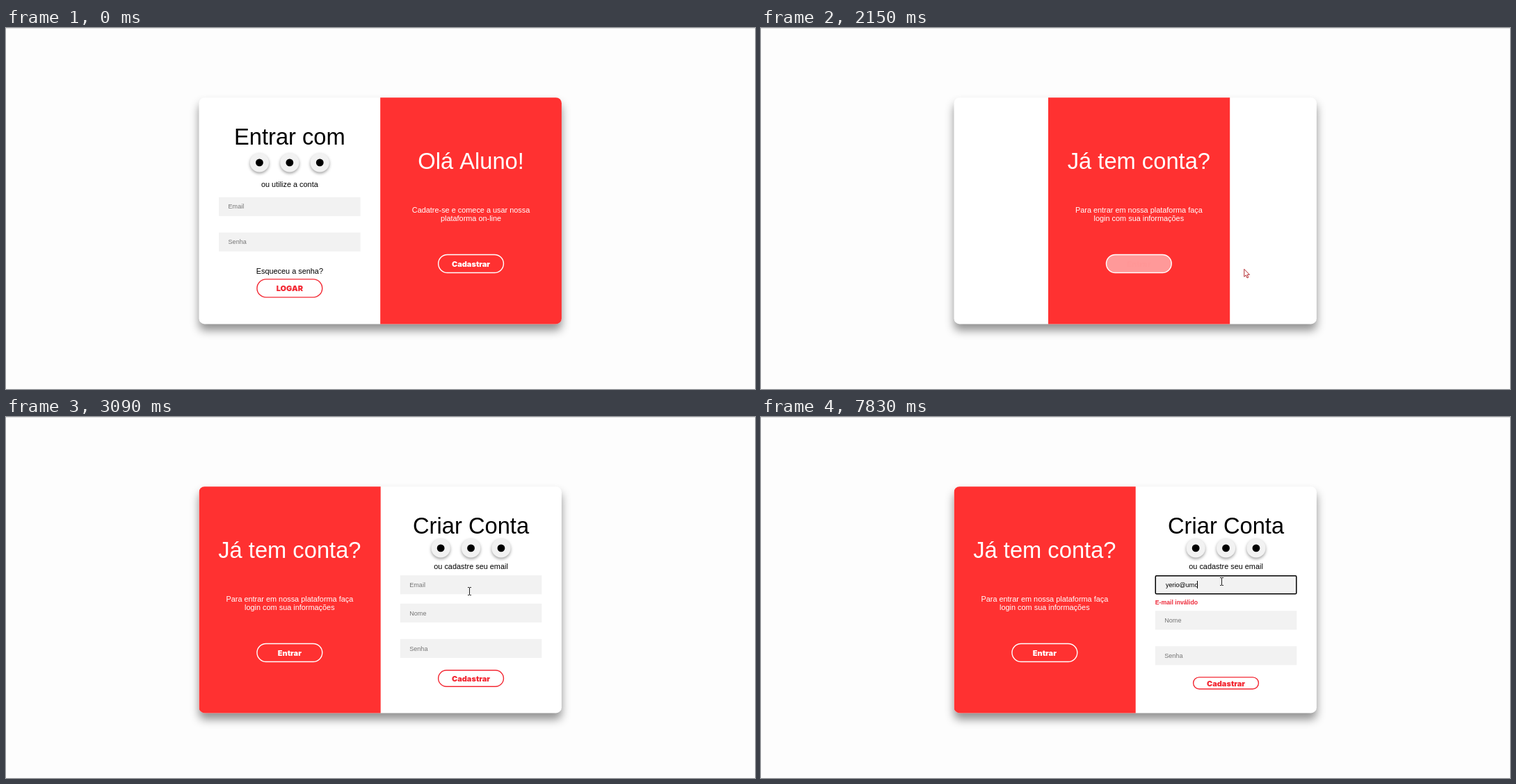
Write an HTML page with a canvas that moves like this. It is 1077 by 520 pixels and loops after 8000 ms.

```html
<!DOCTYPE html>
<html lang="pt">
<head>
<meta charset="utf-8">
<title>Login</title>
<style>
  html, body { margin: 0; width: 100%; height: 100%; overflow: hidden; background: #fdfdfd; }
  canvas { display: block; width: 1077px; height: 520px; }
</style>
</head>
<body>
<canvas id="stage" width="1077" height="520"></canvas>
<script>
const ctx = document.getElementById('stage').getContext('2d');
const LOOP = 8000;
const SANS = '"Liberation Sans", Arial, sans-serif';
const HEAVY = 'Inter, "Liberation Sans", sans-serif';
const RED = '#ff3131', CRIMSON = '#f32833', GREY = '#f2f2f2', HINT = '#757575';
const CARD = { x: 277.5, y: 100.2, w: 521.4, h: 326.2, r: 8 };
const HALF = CARD.w / 2;

const FOCUS = 3420, ERROR = 3550, BLINK = 530, SWAP = 1850;
const TYPED = 'yerio@umo';
const KEY_TIMES = [4620, 5350, 5490, 5890, 5960, 6620, 7230, 7700, 7830];
const POINTER = [
  [920, 940, 508], [1600, 692, 341], [1750, 692, 341], [1850, 694.5, 347], [2690, 694.5, 347],
  [3037, 666.5, 251], [3170, 666.5, 251], [3320, 662.5, 237]
];

const clamp = v => Math.min(1, Math.max(0, v));

// cubic-bezier(.25, .1, .25, 1)
function ease(x) {
  x = clamp(x);
  let lo = 0, hi = 1;
  for (let i = 0; i < 24; i++) {
    const u = (lo + hi) / 2, v = 1 - u;
    if (.75 * v * v * u + .75 * v * u * u + u * u * u < x) lo = u; else hi = u;
  }
  const v = 1 - lo;
  return .3 * v * v * lo + 3 * v * lo * lo + lo ** 3;
}

const progress = (t, start, length) => ease((t - start) / length);

function text(str, x, y, size, color, align = 'center', weight = 400, family = SANS) {
  ctx.font = `${weight} ${size}px ${family}`;
  ctx.textAlign = align;
  ctx.fillStyle = color;
  ctx.fillText(str, x, y);
}

const title = (str, x, y, color) => text(str, x, y, 32.7, color);
const body = (str, x, y, color) => text(str, x, y, 10.9, color);

function rounded(x, y, w, h, r) {
  ctx.beginPath();
  ctx.roundRect(x, y, w, h, r);
}

function shadow(color, blur, dy) {
  ctx.shadowColor = color;
  ctx.shadowBlur = blur;
  ctx.shadowOffsetY = dy;
}

function pill(str, cx, y, h, baseline, color, textColor = color, fill = null) {
  rounded(cx - 46.9, y + .7, 93.8, h - 1.4, h / 2 - .7);
  if (fill) {
    ctx.fillStyle = fill;
    ctx.fill();
  }
  ctx.strokeStyle = color;
  ctx.lineWidth = 1.4;
  ctx.stroke();
  text(str, cx, baseline, 11, textColor, 'center', 900, HEAVY);
}

function field(cx, y, label) {
  ctx.fillStyle = GREY;
  ctx.fillRect(cx - 101.8, y, 203.6, 27.2);
  text(label, cx - 88.3, y + 16.7, 9.07, HINT, 'left');
}

function socialButtons(cx, y) {
  for (const dx of [-43.4, 0, 43.4]) {
    ctx.save();
    shadow('rgba(0,0,0,.38)', 4, 2);
    ctx.fillStyle = GREY;
    ctx.beginPath();
    ctx.arc(cx + dx, y, 13.6, 0, 7);
    ctx.fill();
    ctx.restore();
    ctx.fillStyle = '#000';
    ctx.beginPath();
    ctx.arc(cx + dx, y, 5.4, 0, 7);
    ctx.fill();
  }
}

function loginForm(cx) {
  title('Entrar com', cx, 168, '#000');
  socialButtons(cx, 193.9);
  body('ou utilize a conta', cx, 229, '#000');
  field(cx, 243.7, 'Email');
  field(cx, 294.6, 'Senha');
  body('Esqueceu a senha?', cx, 354, '#000');
  pill('LOGAR', cx, 361.2, 27.4, 379.4, CRIMSON);
}

function focusedField(cx, t) {
  const left = cx - 101.8;
  const count = KEY_TIMES.filter(k => k <= t).length;
  const typed = TYPED.slice(0, count);
  ctx.fillStyle = GREY;
  ctx.fillRect(left, 228.1, 203.6, 27.2);
  rounded(left + .5, 228.7, 202.6, 26, 1.5);
  ctx.strokeStyle = '#000';
  ctx.lineWidth = 1.5;
  ctx.stroke();
  text(typed || 'Email', left + 15.2, 244.8, 9.07, typed ? '#000' : HINT, 'left');
  const since = t - (count ? KEY_TIMES[count - 1] : FOCUS);
  if (Math.floor(since / BLINK) % 2 === 0) {
    const caret = Math.floor(left + 14.6 + ctx.measureText(typed).width);
    ctx.fillStyle = '#000';
    ctx.fillRect(caret, 236, 1, 11);
  }
}

function signupForm(cx, t) {
  const invalid = t >= ERROR;
  const push = invalid ? 10.4 : 0;
  title('Criar Conta', cx, 168, '#000');
  socialButtons(cx, 188.9);
  body('ou cadastre seu email', cx, 219, '#000');
  if (t >= FOCUS) focusedField(cx, t); else field(cx, 228.1, 'Email');
  if (invalid) text('E-mail inválido', cx - 101.8, 270.3, 8.7, '#ee2a3a', 'left', 700);
  field(cx, 268.8 + push, 'Nome');
  field(cx, 319.8 + push, 'Senha');
  if (invalid) pill('Cadastrar', cx, 374.2, 18.2, 387.6, CRIMSON);
  else pill('Cadastrar', cx, 364, 25, 381, CRIMSON);
}

function panel(x, t) {
  const cx = x + HALF / 2;
  const first = t < SWAP;
  const hover = progress(t, 1421, 600) * (1 - progress(t, 1975, 600));
  const tint = 49 + 206 * (1 - hover);
  const lines = first
    ? ['Olá Aluno!', 'Cadatre-se e comece a usar nossa', 'plataforma on-line', 'Cadastrar']
    : ['Já tem conta?', 'Para entrar em nossa plataforma faça', 'login com sua informações', 'Entrar'];
  ctx.fillStyle = RED;
  ctx.fillRect(x, CARD.y - 1, HALF + .5, CARD.h + 2);
  title(lines[0], cx, 203, '#fff');
  body(lines[1], cx, 265.5, '#fff');
  body(lines[2], cx, 277.7, '#fff');
  pill(lines[3], cx, 325.8, 27.4, 344, '#fff', `rgb(255,${tint},${tint})`, `rgba(255,255,255,${hover})`);
}

function pointerAt(t) {
  const next = POINTER.findIndex(k => k[0] > t);
  if (next < 0) return POINTER[POINTER.length - 1].slice(1);
  const [t0, x0, y0] = POINTER[next - 1], [t1, x1, y1] = POINTER[next];
  const k = progress(t, t0, t1 - t0);
  return [x0 + (x1 - x0) * k, y0 + (y1 - y0) * k];
}

function shape(d, fill, stroke, width) {
  const path = new Path2D(d);
  if (fill) {
    ctx.fillStyle = fill;
    ctx.fill(path);
  }
  ctx.strokeStyle = stroke;
  ctx.lineWidth = width;
  ctx.stroke(path);
}

function pointer(t) {
  const [x, y] = pointerAt(t);
  const overButton = t > 1421 && t < 1975;
  const overField = t > 2690 && [228, 268.8, 319.8].some(top => y > top && y < top + 27.2);
  ctx.save();
  ctx.translate(x, y);
  ctx.lineJoin = 'round';
  if (overField) {
    shape('M-2.5-5.5H-.7L0-5 .7-5.5H2.5M0-5V5M-2.5 5.5H-.7L0 5 .7 5.5H2.5', null, '#222', 1);
  } else if (overButton) {
    shape('M-1.3 8V1Q-1.3 0 0 0T1.2 1V5.2L5.6 6.2Q7 6.6 7 8V11L5.4 15H-.4L-3.8 9.6Q-4.4 8-3 7.6Z',
      '#fff', '#222', 1);
    shape('M3 5.8V8M5 6.3V8.3', null, '#222', .7);
  } else {
    shape('M.3.3V11.3L2.8 9 4.5 13 6.3 12.2 4.6 8.3H8Z', '#fff', '#b3282d', 1);
  }
  ctx.restore();
}

function draw(time) {
  const t = time < 920 ? time : 920 + 68.3 * Math.floor((time - 916) / 68.3);
  const slide = progress(t, 1863, 1010);
  const formX = CARD.x + HALF / 2 + HALF * slide;

  ctx.fillStyle = '#fdfdfd';
  ctx.fillRect(0, 0, 1077, 520);
  ctx.fillStyle = '#e2e2e2';
  ctx.fillRect(0, 0, 1077, 1);

  ctx.save();
  shadow('rgba(0,0,0,.43)', 13, 9);
  ctx.fillStyle = '#fff';
  rounded(CARD.x, CARD.y, CARD.w, CARD.h, CARD.r);
  ctx.fill();
  ctx.restore();

  ctx.save();
  rounded(CARD.x, CARD.y, CARD.w, CARD.h, CARD.r);
  ctx.clip();
  if (slide < 1) {
    ctx.globalAlpha = 1 - slide;
    loginForm(formX);
  }
  if (slide > 0) {
    ctx.globalAlpha = slide;
    signupForm(formX, time);
  }
  ctx.globalAlpha = 1;
  panel(CARD.x + HALF * (1 - slide), t);
  ctx.restore();

  if (time >= 920) pointer(t);
}

const begin = performance.now();
function tick() {
  draw((performance.now() - begin) % LOOP);
  requestAnimationFrame(tick);
}
tick();
</script>
</body>
</html>
```
